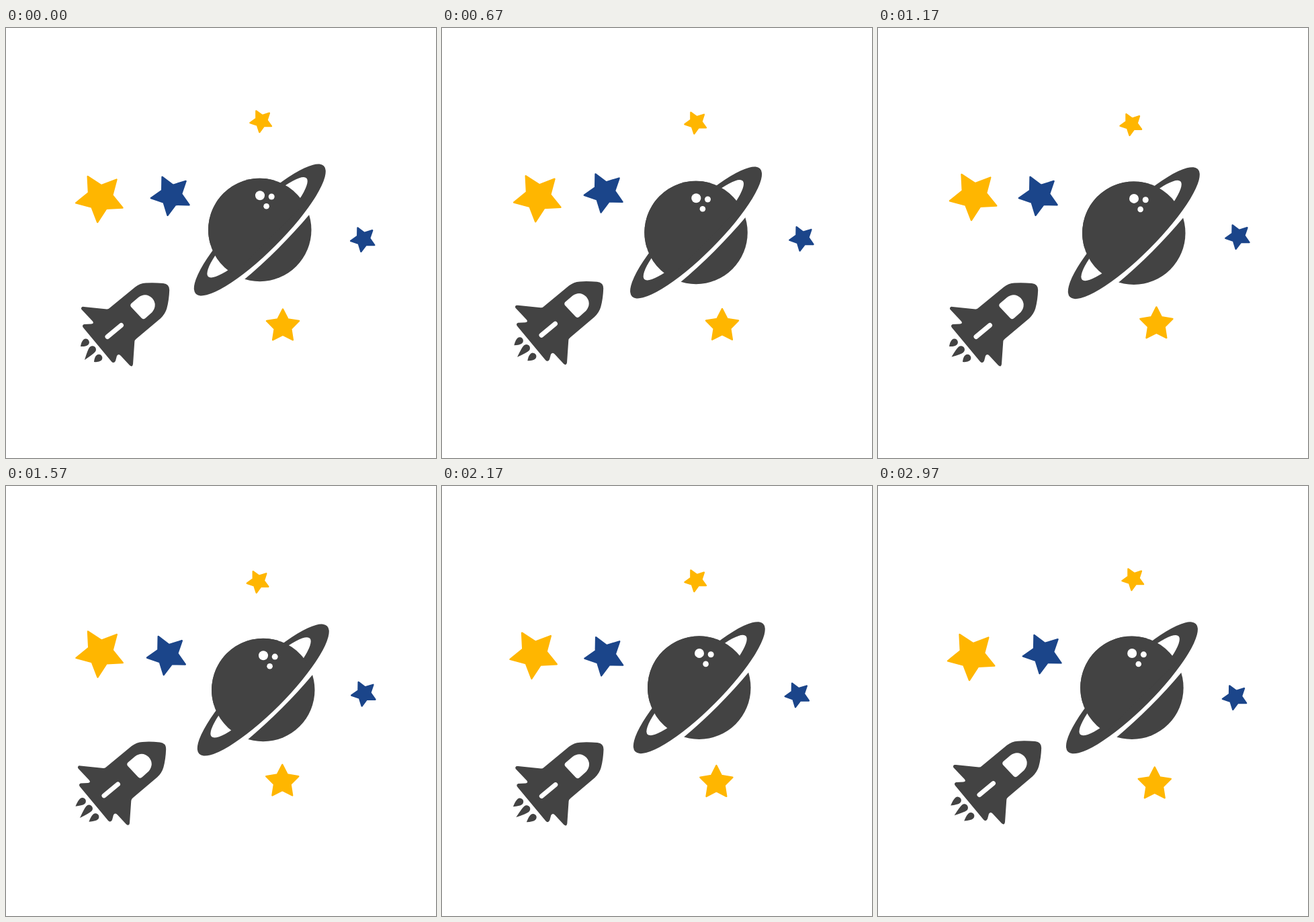
Write an HTML page that moves like this. It is 640 by 640 pixels and loops after 3010 ms.

```html
<!DOCTYPE html>
<html lang="en">
<head>
<meta charset="utf-8">
<title>Space</title>
<style>
  html, body { margin: 0; width: 100%; height: 100%; overflow: hidden; background: #fff; }
  svg { display: block; width: 100%; height: 100%; }
  .dark { fill: #434343; }
  .light { fill: #fff; }
  .star { stroke-width: 2.4; stroke-linejoin: round; }
</style>
</head>
<body>
<svg id="sky" viewBox="0 0 640 640">
  <g id="planet">
    <g transform="translate(377.8 300.5) rotate(-45)">
      <circle class="dark" r="76.7"/>
      <ellipse class="light" rx="180" ry="38.8"/>
      <ellipse class="dark" rx="134.6" ry="33"/>
      <ellipse class="light" cy="-5.3" rx="103.5" ry="21"/>
      <path class="dark" d="M-74 20A76.7 76.7 0 1 1 74 20Z"/>
    </g>
    <g class="light">
      <circle cx="378" cy="249.2" r="7"/>
      <circle cx="395.2" cy="251" r="4.5"/>
      <circle cx="387.6" cy="265.2" r="4.3"/>
    </g>
  </g>
  <g id="rocket">
    <path class="dark" d="M113 415.2Q111 417 112.3 418.8L129 436.5Q131.5 440 127 440.5L116 441
      Q112.5 442.5 115 446L157 496.5Q160.5 500 163 495.5L165 488Q167.5 484 171 488L184 502
      Q188 505.5 189 500.5L191.3 467Q191.5 464.5 194 462.6L230 432.2Q237 425.5 239.3 417.5
      Q242.7 405 243.2 390Q243.2 381 234 380Q218 378.5 208 379.6Q199 380.2 192 385.7
      L154.5 416.6Q152.5 418.7 150 418.5L116 415Q114 414.6 113 415.2Z"/>
    <path class="light" d="M186 415Q184 412 187 409.5L197 401Q208 393 217.5 402
      Q226 412 217.5 423L208 431.5Q204.5 435 201.5 431.5Z"/>
    <path d="M151 459.5L171.5 442.5" stroke="#fff" stroke-width="7" stroke-linecap="round"/>
    <path class="dark" id="flameTop"/>
    <path class="dark" id="flameMid"/>
    <path class="dark" id="flameLow"/>
  </g>
</svg>
<script>
const LOOP = 3010;
const KNOTS = [0, 670, 1170, 1570, 2170, 2630];
const GOLD = '#ffb600', BLUE = '#1b458a';
const sky = document.getElementById('sky');
const byId = id => document.getElementById(id);

function addStar(x, y, r, turn, color) {
  const points = Array.from({ length: 10 }, (_, i) => {
    const a = (turn + i * 36) * Math.PI / 180;
    const d = (r - 1.2) * (i % 2 ? 0.51 : 1);
    return (x + d * Math.cos(a)).toFixed(2) + ',' + (y + d * Math.sin(a)).toFixed(2);
  });
  const star = document.createElementNS('http://www.w3.org/2000/svg', 'polygon');
  star.setAttribute('class', 'star');
  star.setAttribute('points', points.join(' '));
  star.setAttribute('fill', color);
  star.setAttribute('stroke', color);
  sky.append(star);
  return star;
}

// Offsets from the rest position at each knot of the closed drift path.
const drifts = [
  { el: byId('planet'), x: [0, .3, 3, 5, 5, 2], y: [0, 4, 4.7, 3.1, -.3, -1.2] },
  { el: byId('rocket'), x: [0, -3, -5, -5, -2.7, -1], y: [0, -2.2, 0, 1.4, 2.1, .9] },
  { el: addStar(140, 252.7, 37.8, -120, GOLD),
    x: [0, 3, 2.8, .3, -2.7, -1.6], y: [0, -.8, -3, -4.5, -2.4, -.3] },
  { el: addStar(245.8, 249, 31.5, -116, BLUE),
    x: [0, -4, -6, -5.8, -3.4, -1.7], y: [0, -4.4, 0, 2.3, 3.4, 1.4] },
  { el: addStar(531.7, 314.3, 20, -116, BLUE),
    x: [0, 4.2, 4.2, 1.2, -2.4, -1.6], y: [0, -1.2, -4, -5.4, -3.7, -1] },
  { el: addStar(380, 138.5, 18, -117, GOLD),
    x: [0, -2, -2.9, -4.6, -2, 0], y: [0, 2.2, 4.6, 3.7, 2, 1] },
  { el: addStar(412, 443.8, 26.5, -90, GOLD),
    x: [0, 5, 2.4, -.7, -3.6, -2], y: [0, -.5, -3.1, -3.8, -2.4, -.5] }
];

const count = KNOTS.length;
const wrap = i => (i + count) % count;
const knotTime = i => KNOTS[wrap(i)] + Math.floor(i / count) * LOOP;

function slope(v, i) {
  const before = knotTime(i) - knotTime(i - 1), after = knotTime(i + 1) - knotTime(i);
  const rise = (v[wrap(i)] - v[wrap(i - 1)]) / before;
  const next = (v[wrap(i + 1)] - v[wrap(i)]) / after;
  return (rise * after + next * before) / (before + after);
}

// Closed smooth curve through the knot values.
function glide(v, t) {
  let i = count - 1;
  while (KNOTS[i] > t) i--;
  const span = knotTime(i + 1) - KNOTS[i];
  const p = (t - KNOTS[i]) / span, q = 1 - p;
  return v[i] * q * q * (1 + 2 * p) + v[wrap(i + 1)] * p * p * (3 - 2 * p)
    + span * p * q * (slope(v, i) * q - slope(v, i + 1) * p);
}

const TIP_TIMES = [...KNOTS, 2970, LOOP];
const TIP_X = [117, 115, 114.5, 115, 113, 113.5, 113.5, 117];
const TIP_Y = [494, 492, 489.5, 492.6, 491, 491.6, 490, 494];

function linear(v, t) {
  let i = 0;
  while (TIP_TIMES[i + 1] <= t) i++;
  return v[i] + (v[i + 1] - v[i]) * (t - TIP_TIMES[i]) / (TIP_TIMES[i + 1] - TIP_TIMES[i]);
}

function drawFlame(id, cx, cy, r, tx, ty) {
  const len = Math.hypot(cx - tx, cy - ty);
  const dx = (cx - tx) / len * r, dy = (cy - ty) / len * r;
  const bx = cx - dx * 0.8, by = cy - dy * 0.8;
  byId(id).setAttribute('d',
    `M${tx} ${ty}Q${bx - dy} ${by + dx} ${cx - dy} ${cy + dx}` +
    `A${r} ${r} 0 0 0 ${cx + dy} ${cy - dx}Q${bx + dy} ${by - dx} ${tx} ${ty}Z`);
}

function draw(t) {
  for (const d of drifts) {
    d.el.setAttribute('transform', `translate(${glide(d.x, t).toFixed(3)} ${glide(d.y, t).toFixed(3)})`);
  }
  const reach = 2.1 * (1 - Math.cos(t / 234 * 2 * Math.PI));
  drawFlame('flameTop', 118.7, 467.7, 5.2, 111 - reach, 474 + reach / 2);
  drawFlame('flameMid', 128.6, 478.6, 5.4, linear(TIP_X, t), linear(TIP_Y, t));
  drawFlame('flameLow', 138.2, 491, 5.2, 131 - reach, 497 + reach / 2);
}

const start = performance.now();
function tick() {
  draw((performance.now() - start) % LOOP);
  requestAnimationFrame(tick);
}
tick();
</script>
</body>
</html>
```
